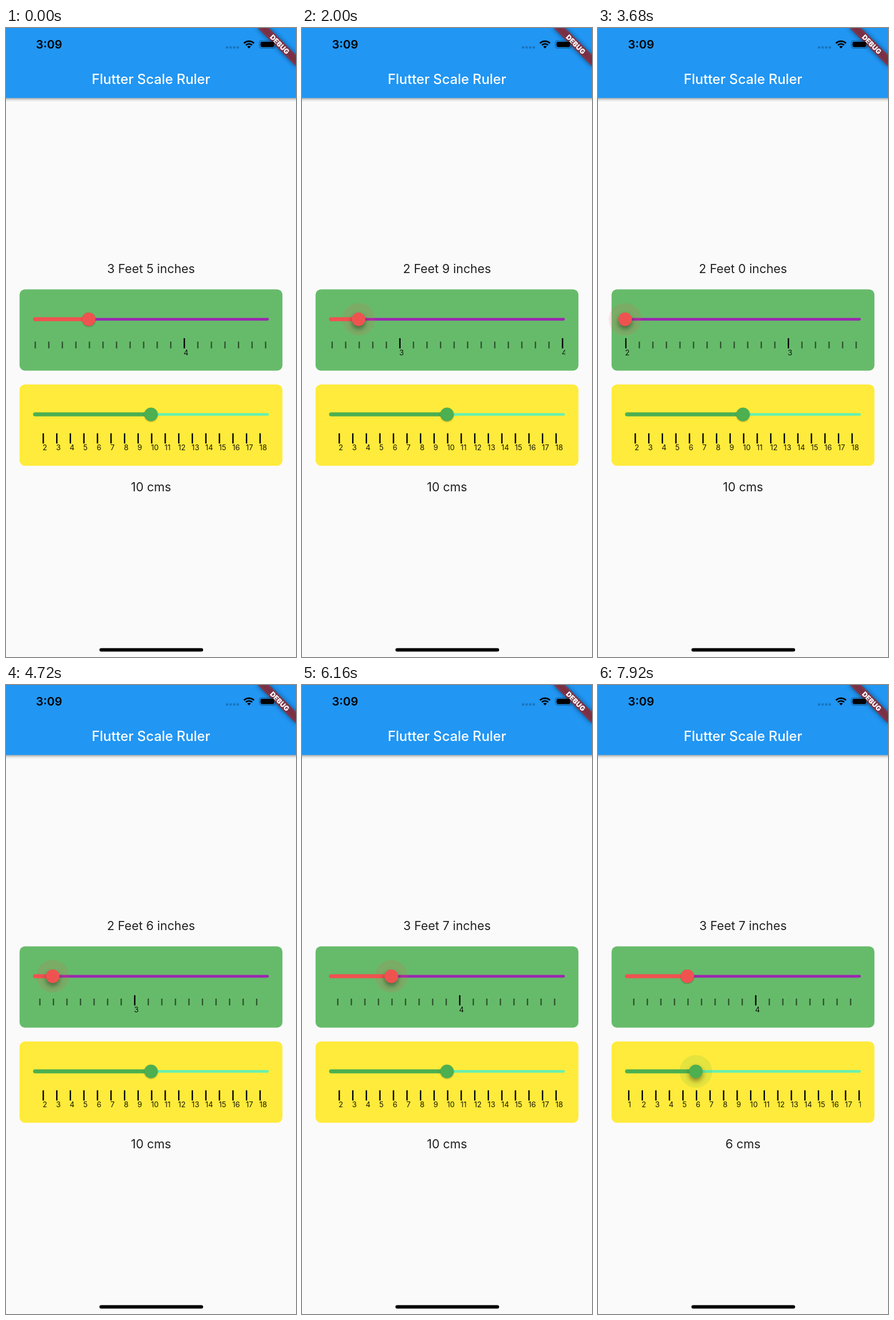
These frames come from a looping animation (509x1101 px, 8000 ms). An HTML page:

```html
<!DOCTYPE html>
<html lang="en">
<head>
<meta charset="utf-8">
<title>Scale ruler</title>
<style>
  html, body { margin: 0; width: 100%; height: 100%; overflow: hidden; background: #fafafa; }
  svg { display: block; width: 100%; height: 100%; }
  text { font-family: Inter, Roboto, sans-serif; }
  .bar { fill: #2196f3; filter: drop-shadow(0 2px 2.5px rgba(0, 0, 0, .38)); }
  .title { font-size: 23.8px; font-weight: 500; fill: #fff; }
  .clock { font-size: 20.4px; font-weight: 600; }
  .value { font-size: 21.4px; fill: #212121; }
  .label { font-size: 13px; fill: rgba(0, 0, 0, .9); }
  .debug { font-size: 12.1px; font-weight: 900; fill: #fff; }
  .shade { filter: blur(4px); }
  .mid { text-anchor: middle; }
</style>
</head>
<body>
<svg viewBox="0 0 509 1101">
  <defs>
    <clipPath id="inner"><rect x="47.57" y="0" width="413.86" height="1101"/></clipPath>
  </defs>
  <rect width="509" height="1101" fill="#fafafa"/>
  <rect class="bar" x="-10" y="-10" width="529" height="132.5"/>
  <text class="title mid" x="254.5" y="97.6">Flutter Scale Ruler</text>
  <g id="app"></g>

  <g transform="translate(509 0) rotate(45)">
    <rect class="shade" x="-47.6" y="33.3" width="95.2" height="14.3" opacity=".5"/>
    <rect x="-47.6" y="33.3" width="95.2" height="14.3" fill="#b71c1c" fill-opacity=".627"/>
    <text class="debug mid" x="0" y="44.9">DEBUG</text>
  </g>

  <text class="clock" x="52.6" y="36.3">3:09</text>
  <g opacity=".22">
    <circle cx="388" cy="34" r="2.2"/><circle cx="394.2" cy="34" r="2.2"/>
    <circle cx="400.4" cy="34" r="2.2"/><circle cx="406.6" cy="34" r="2.2"/>
  </g>
  <g fill="none" stroke="#000" stroke-width="2.7">
    <path d="M417.7 26.7a12.4 12.4 0 0 1 17.6 0"/>
    <path d="M421 30a7.8 7.8 0 0 1 11 0"/>
    <path d="M426.5 35.8l-3.1-3.2a4.4 4.4 0 0 1 6.2 0z" fill="#000" stroke="none"/>
  </g>
  <rect x="444.7" y="22" width="28" height="13.4" rx="4" fill="none" stroke="#000" stroke-opacity=".38" stroke-width="1.2"/>
  <rect x="446.7" y="24" width="24" height="9.4" rx="2.4"/>
  <path d="M474.4 26.4q1.8.7 1.8 2.3t-1.8 2.3z" fill-opacity=".42"/>
  <rect x="164" y="1085.5" width="182" height="6" rx="3"/>
</svg>
<script>
const DP = 509 / 428, LEFT = 40 * DP, WIDTH = 348 * DP, PITCH = 20 * DP;
const LOOP = 8000, STEP = 80;

const sliders = [
  {
    top: 457.4, min: 24, count: 72, textY: 429.2, card: '#66bb6a', on: '#ef5350', off: '#9c27b0',
    major: v => v % 12 === 0, label: v => v / 12,
    text: v => `${Math.floor(v / 12)} Feet ${v % 12} inches`,
    press: [960, 6160],
    path: [[1120, 41], [2000, 33], [2720, 29], [3360, 25], [3520, 25], [3600, 24], [4240, 24],
           [4800, 31], [5120, 38], [5440, 42], [5680, 42], [5760, 43]]
  },
  {
    top: 623.9, min: 0, count: 20, textY: 811.2, card: '#ffeb3b', on: '#4caf50', off: '#69f0ae',
    major: () => true, label: v => v,
    text: v => `${v} cms`,
    press: [6640, 9000],
    path: [[7200, 10], [7840, 6]]
  }
];

function add(parent, tag, attrs, text) {
  const el = document.createElementNS('http://www.w3.org/2000/svg', tag);
  for (const key in attrs) el.setAttribute(key, attrs[key]);
  if (text !== undefined) el.textContent = text;
  return parent.appendChild(el);
}

function build(s) {
  const app = document.getElementById('app');
  const y = s.top + 52.4, tickEnd = s.top + 103.4;
  const track = (h, fill) => add(app, 'rect',
    { x: LEFT, y: y - h / 2, width: WIDTH, height: h, rx: h / 2, fill });

  s.readout = add(app, 'text', { class: 'value mid', x: 254.5, y: s.textY });
  add(app, 'rect', { x: 20 * DP, y: s.top, width: 388 * DP, height: 142.4, rx: 9.5, fill: s.card });
  track(4 * DP, s.off);
  s.active = track(6 * DP, s.on);
  s.halo = add(app, 'circle', { cy: y, fill: s.on, 'fill-opacity': .14 });
  s.knob = add(app, 'circle', { cy: y, r: 10 * DP, fill: s.on });

  const frame = add(app, 'g', { 'clip-path': 'url(#inner)' });
  s.ruler = add(frame, 'g', {});
  for (let i = 0; i < s.count; i++) {
    const v = s.min + i, x = LEFT + i * PITCH, big = s.major(v), h = (big ? 15 : 10) * DP;
    add(s.ruler, 'rect', { x, y: tickEnd - h, width: 2 * DP, height: h, 'fill-opacity': big ? 1 : .54 });
    if (big) add(s.ruler, 'text', { class: 'label', x, y: s.top + 115.4 }, s.label(v));
  }
}

function valueAt(path, t) {
  const next = path.findIndex(p => p[0] > t);
  if (next === 0) return path[0][1];
  if (next < 0) return path[path.length - 1][1];
  const [t0, a] = path[next - 1], [t1, b] = path[next];
  return Math.round(a + (b - a) * (t - t0) / (t1 - t0));
}

const ramp = (t, start) => Math.min(1, Math.max(0, (t - start) / 160));
const ease = p => 1 - (1 - p) ** 2;

function draw(t) {
  for (const s of sliders) {
    const v = valueAt(s.path, t), part = (v - s.min) / s.count;
    const x = LEFT + part * WIDTH;
    const held = ease(ramp(t, s.press[0]) - ramp(t, s.press[1]));
    s.readout.textContent = s.text(v);
    s.active.setAttribute('width', part * WIDTH);
    s.knob.setAttribute('cx', x);
    s.halo.setAttribute('cx', x);
    s.halo.setAttribute('r', 24 * DP * held);
    s.knob.style.filter =
      `drop-shadow(0 ${1 + 4 * held}px ${1 + 3 * held}px rgba(0, 0, 0, ${.3 + .1 * held}))`;
    s.ruler.setAttribute('transform', `translate(${-part * (s.count * PITCH - WIDTH)} 0)`);
  }
}

sliders.forEach(build);
const start = performance.now();
function tick() {
  const t = (performance.now() - start) % LOOP;
  draw(Math.floor(t / STEP) * STEP);
  requestAnimationFrame(tick);
}
draw(0);
requestAnimationFrame(tick);
</script>
</body>
</html>
```
